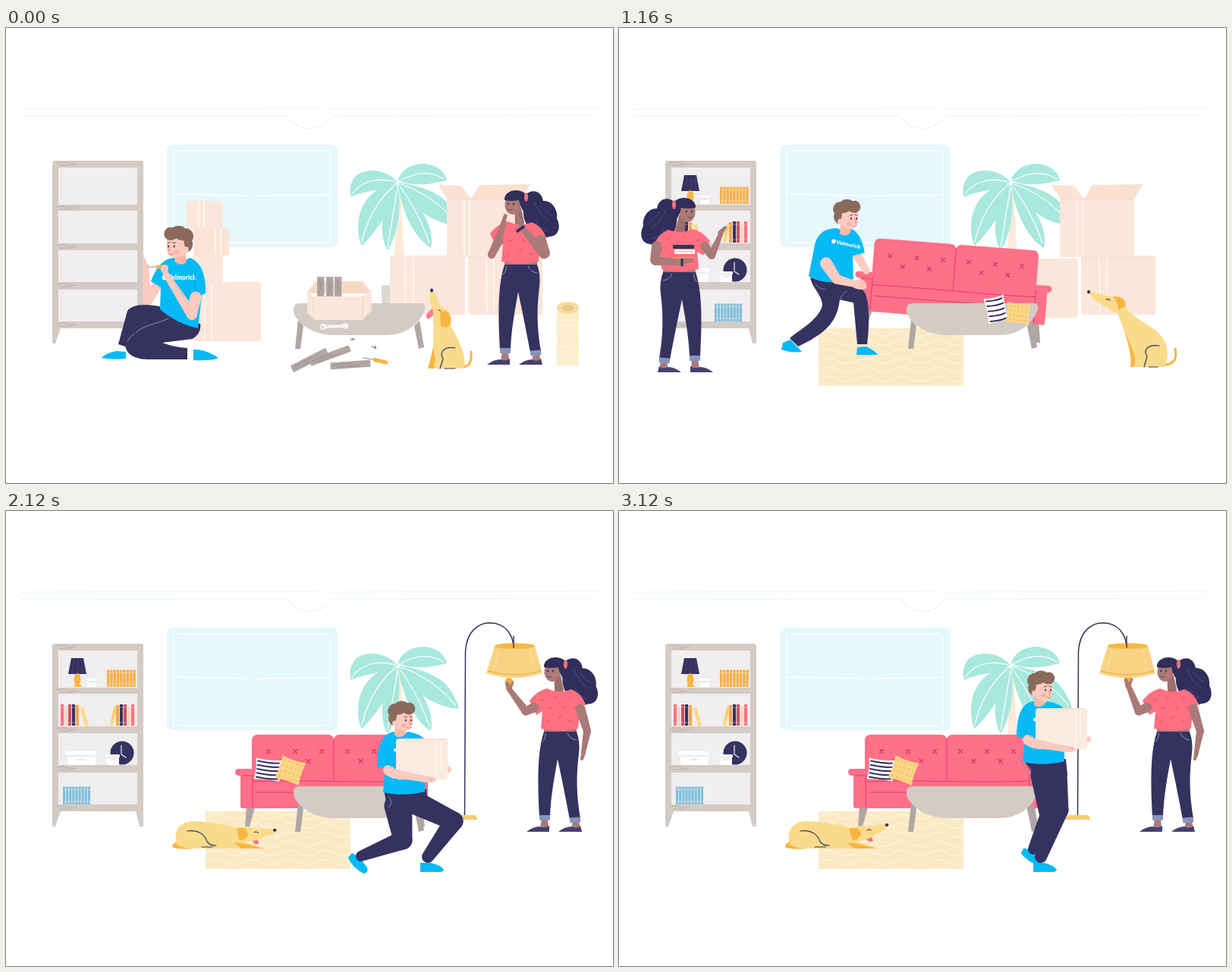
An HTML page that plays this animation: 800 by 600 pixels, repeating every 3160 ms.

```html
<!DOCTYPE html>
<html lang="en">
<head>
<meta charset="utf-8">
<title>Moving in</title>
<style>
html, body { margin: 0; width: 100%; height: 100%; overflow: hidden; background: #fff; }
svg { display: block; width: 800px; height: 600px; }
</style>
</head>
<body>
<svg id="stage" viewBox="0 0 800 600"></svg>
<script>
const LOOP = 3160, CUT1 = 1040, CUT2 = 2080;
const navy = '#363260', pink = '#ff7089', wood = '#d4cbc5', leg = '#b0a7a5', carton = '#fae6da',
  cream = '#fbeac6', gold = '#fadb8c', orange = '#f9b540', cyan = '#06baf5', fair = '#fccbbf',
  brown = '#a97a77', coral = '#ff7080', hairNavy = '#312e5c', white = '#fff';

// Drawing helpers, each returns SVG markup
const fill = (d, c) => `<path d="${d}" fill="${c}"/>`;
const line = (d, c = white, w = 1.3) =>
  `<path d="${d}" fill="none" stroke="${c}" stroke-width="${w}" stroke-linecap="round" stroke-linejoin="round"/>`;
const rect = (x, y, w, h, c, r = 0) => `<rect x="${x}" y="${y}" width="${w}" height="${h}" rx="${r}" fill="${c}"/>`;
const oval = (x, y, rx, ry, c) => `<ellipse cx="${x}" cy="${y}" rx="${rx}" ry="${ry}" fill="${c}"/>`;
const group = (tf, ...kids) => `<g transform="${tf}">${kids.join('')}</g>`;
const repeat = (n, f) => Array.from({ length: n }, (_, i) => f(i)).join('');
function limb(x1, y1, w1, x2, y2, w2, c) {
  const a = Math.atan2(y2 - y1, x2 - x1) + Math.PI / 2, u = Math.cos(a) / 2, v = Math.sin(a) / 2;
  return fill(`M${x1 + u * w1},${y1 + v * w1}L${x2 + u * w2},${y2 + v * w2}
    A${w2 / 2},${w2 / 2} 0 0 0 ${x2 - u * w2},${y2 - v * w2}L${x1 - u * w1},${y1 - v * w1}
    A${w1 / 2},${w1 / 2} 0 0 0 ${x1 + u * w1},${y1 + v * w1}Z`, c);
}

const clamp = u => Math.max(0, Math.min(1, u));
const ease = u => (u = clamp(u), u * u * (3 - 2 * u));
const mix = (a, b, u) => a + (b - a) * u;
// 0 at the start, 1 half a period later
const swing = (t, period) => (1 - Math.cos(2 * Math.PI * t / period)) / 2;

function grain(x, y, w = 22) {
  return line(`M${x},${y}q${w / 3},-2 ${w / 2},0t${w / 2},1M${x + 4},${y + 3}h${w * .6}`, '#b8a8a1', .8);
}
const plank = (x, y, w, h, angle) =>
  group(`translate(${x} ${y}) rotate(${angle})`, rect(-w / 2, -h / 2, w, h, leg, 1),
    line(`M${4 - w / 2},-1q${w / 4},-2 ${w / 2},0M${10 - w / 2},2h${w / 2}`, '#958a87', .7));

const palm = fill('M516,215H520L525,303H512Z', '#fbead9') + [
  'M516,203C501,186 476,184 462,194C453,203 452,215 455,223C470,214 496,216 516,203',
  'M514,206C488,208 470,225 465,250C462,270 466,282 469,287C488,268 512,236 514,206',
  'M516,206C501,225 494,250 496,270Q498,288 503,293C517,272 522,235 516,206',
  'M517,201C520,186 540,176 558,180C572,183 580,193 581,201C560,206 538,210 517,201',
  'M518,204C540,207 572,215 585,235Q595,250 597,261C570,260 532,240 518,204',
  'M517,206C532,216 555,245 560,270Q562,285 560,290C542,280 522,248 517,206'
].map(d => fill(d, '#a8e8df')).join('') +
  line('M513,203C490,196 468,202 456,219M512,208C494,222 476,250 469,282M516,210C511,240 506,270 503,289M520,201C540,190 560,188 577,199M521,206C550,216 576,235 592,256M520,210C538,235 550,260 558,284', white, 1.2);

const room =
  line('M20,107L418,106M425,107L780,106M20,116H371M429,116L772,115M373,117C382,136 414,138 427,119', '#e4f5fd', 1.1) +
  rect(212, 154, 225, 135, '#e6f7fd', 8) +
  line('M228,162H424M221,163V283M427,164V283M222,219L320,221M328,221L424,220M228,283H420') +
  fill('M64,175H178Q181,175 181,179V416H176L171,396H72L65,416H61V179Q61,175 64,175Z', wood) +
  [[184, 49], [241, 43], [293, 42], [345, 42]].map(([y, h]) => rect(69, y, 104, h, '#f0eeef')).join('') +
  [178, 236, 287, 338, 390].map(y => grain(67, y, 26)).join('') + palm;

const table =
  fill('M385,385L392,393L388,423H381ZM538,393L545,386L551,421L544,423Z', leg) +
  fill('M386,363H546Q554,363 552,371C545,392 525,405 500,405H430C405,404 388,392 380,378Q376,364 386,363Z', wood);

function crates(dy) {
  return rect(506, 300 + dy, 99, 78, carton, 4) + rect(609, 300, 98, 78, carton, 4) + rect(581, 224, 98, 78, carton, 2) +
    fill('M570,207L600,208L612,225H581Z', '#fae3d5') + fill('M624,207L691,206L678,227H612Z', '#fbe0d0') +
    line(`M526,302V${376 + dy}M537,302V${374 + dy}M633,303L634,376M643,303V374M604,227V300M611,227V300`) +
    line('M583,226H676M612,303H704', '#f5d5c4', .8);
}

function rug() {
  return rect(263, 396, 191, 76, cream) +
    repeat(6, i => line(`M265,${403 + i * 12}q12,-7 24,0` + 't24,0'.repeat(6) + 't20,0', '#fff5de', 1.4));
}

function books(x, base, list, w = 4.2) {
  return list.map(([c, h], i) => rect(x + i * w, base - h, w - .9, h, c) +
    line(`M${x + i * w + 1},${base - h + 4}h1.3M${x + i * w + 1},${base - 4}h1.3`, '#fff3d6', .7)).join('');
}
const row = (n, c, h) => Array.from({ length: n }, () => [c, h]);
const mixed = [[coral, 28], ['#f3d6c4', 25], ['#c9505f', 28], [navy, 28], ['#f3a44c', 27]];
function shelfItems(blueX) {
  return fill('M86,194H102L106,215H82Z', navy) + oval(94, 222, 4.5, 8, orange) + rect(90, 229, 9, 3, orange) +
    line('M90,196L87,213M95,196V213M100,196L102,213', '#4d4978', .7) +
    rect(107, 223, 12, 9, white) + rect(106, 221, 14, 3, white, 1) + line('M111,226h4M107,225h12', '#cfc7c6', .7) +
    books(133, 232, row(9, '#f5ae45', 22.5), 4.3) +
    books(72, 283, mixed, 5) + group('rotate(-15 110 283)', rect(104, 257, 5, 26, gold)) +
    group('rotate(14 136 283)', rect(136, 256, 5, 26, gold), line('M138,261v12', orange, 1)) +
    books(145, 283, mixed.slice().reverse(), 5) +
    rect(81, 320, 37, 15, white) + rect(79, 317, 40, 5, white, 1) + line('M94,328h10M81,323h36', '#cfc7c6', .8) +
    oval(153, 319, 15.5, 15.5, navy) + line('M152,309V321L158,325', white, 1.1) +
    rect(133, 323, 16, 12, white) + rect(132, 321, 18, 4, white, 1) + line('M138,328h6M134,325h14', '#cfc7c6', .8) +
    books(blueX, 387, row(9, '#7dbddc', 23.5), 4.1);
}

function sofa() {
  const cross = (x, y) => line(`M${x - 2.5},${y - 2.5}l5,5m0,-5l-5,5`, '#cf2f52', 1.1);
  return fill('M317,388H329L321,416H315ZM536,388H548L552,416H546Z', leg) +
    rect(324, 295, 108, 75, pink, 7) + rect(432, 295, 109, 75, pink, 7) +
    rect(309, 345, 247, 47, pink, 3) + rect(302, 340, 25, 9, pink, 4.5) + rect(538, 340, 24, 9, pink, 4.5) +
    line('M432,300V356M326,357C380,354 480,359 540,356M325,347V390M311,349H323M541,347V390M330,371H536', '#dd3f60', 1) +
    repeat(10, i => cross(346 + i % 5 * 17.5 + (i > 4 ? 104 : 0), i % 5 % 2 ? 330 : 317));
}

function pillow(x, y, w, h, angle, striped) {
  const a = w / 2, b = h / 2;
  const shape = `M${-a},${-b}Q0,${-b + 3} ${a},${-b}Q${a - 3},0 ${a},${b}Q0,${b - 2} ${-a},${b}Q${-a + 3},0 ${-a},${-b}Z`;
  const deco = striped
    ? repeat(5, i => line(`M${-a + 3},${-b + 4 + i * (h - 7) / 4}q${a},2 ${w - 6},0`, navy, 2))
    : repeat(20, i => oval(-a + 5 + i % 5 * (w - 10) / 4, -b + 5 + (i / 5 | 0) * (h - 9) / 3, .8, .8, '#e9a63c'));
  return group(`translate(${x} ${y}) rotate(${angle})`, fill(shape, striped ? white : '#fad585'), deco);
}

// Head facing right, origin at the middle of the face
const manHead =
  fill('M-8,5L-9,19Q-2,24 5,18L6,10Z', '#f8b9a9') +
  fill('M-9,-12H14Q17,0 14,7Q11,13 4,13Q-7,12 -9,3Z', fair) +
  fill('M-11,6C-17,3 -18,-4 -16,-8C-21,-14 -15,-24 -8,-23C-3,-28 4,-27 8,-24C15,-27 21,-18 17,-12C13,-7 8,-8 3,-11C0,-8 -3,-9 -6,-8C-6,-3 -8,2 -11,6Z', '#8a6a5d') +
  oval(-9, 3, 2.8, 3.6, fair) + oval(6, -1, 1, 1.5, navy) + oval(13, -1, 1, 1.5, navy) +
  oval(3, 6, 3, 2.5, '#ffaaa6') + line('M10,0l3,4l-2,1M7,8q3,3 6,0', '#d9756e', .9) +
  line('M4,-5l4,-1M11,-6l3,1', '#6d5146', 1);

const label = (x, y, size, angle = 0) => group(`translate(${x} ${y}) rotate(${angle})`,
  oval(0, 0, size * .4, size * .4, white),
  `<text x="${size * .5}" y="${size * .34}" fill="#fff" font-family="Lato, Inter, sans-serif" font-weight="900" font-size="${size}">Velmorick</text>`);

// Standing woman facing left, without arms
function woman(sway) {
  return group(`rotate(${sway} 737 204)`,
      fill('M736,199C746,190 758,194 760,207C772,206 780,220 778,230C784,242 780,254 768,254C757,259 745,250 744,243C732,238 732,215 736,199Z', hairNavy),
      line('M748,208Q755,225 767,233M756,212Q764,222 771,226M750,232Q755,244 766,247', '#59558a', .8)) +
    limb(727, 219, 9, 729, 236, 12, '#9c6e6b') + oval(720, 212, 10.5, 13, brown) +
    fill('M709,206C708,193 727,189 736,197C741,205 740,217 735,222Q730,216 728,206Q718,208 709,206Z', hairNavy) +
    oval(737.5, 202, 2.5, 6, coral) + oval(714, 211, 1, 1.4, hairNavy) + oval(721, 211, 1, 1.4, hairNavy) +
    oval(724, 216, 2.5, 2, '#cb7774') + line('M713,218q3,3 6,0', '#6d3f42', 1) +
    rect(709, 284, 43, 10, brown) +
    fill('M713,234Q700,237 690,250L699,269L707,264L705,287Q730,293 754,287L756,262L764,255Q758,240 745,235Q730,242 713,234Z', coral) +
    line('M704,248l4,2M722,246l3,-2M742,245l4,3M715,260l4,-1M733,258l4,2M748,260l3,-2M712,276l3,2M728,273l4,-2M742,277l4,1M697,256l3,1', '#d8475c', 1) +
    fill('M706,406H714L715,418H704ZM747,409H755L757,420H745Z', brown) +
    fill('M709,291H752Q757,305 755,320C752,345 751,370 757,405L743,407C738,380 732,350 727,327C723,350 718,375 717,403H703C700,350 701,315 709,291Z', navy) +
    rect(703, 401, 14, 7, '#8793bb', 1) + group('rotate(-5 750 407)', rect(743, 404, 14, 7, '#8793bb', 1)) +
    line('M711,293Q712,300 707,304M740,293Q743,301 752,302', '#a6acd0', .8) +
    fill('M686,423Q693,417 703,416Q710,419 716,415V423ZM728,423Q735,417 745,416Q753,420 757,415L759,423Z', '#46416f');
}

function kneelingMan(t) {
  const turn = swing(t, 480), lean = swing(t, 1440), tool = `translate(${-4 * turn} ${2 * turn})`;
  return fill('M126,435Q132,428 146,426L158,427V436Q140,438 126,435ZM247,424Q262,423 280,435Q272,439 247,438Z', cyan) +
    limb(201, 336, 14, 187, 360, 12, fair) + limb(186, 361, 12, 184, 314, 8, fair) +
    limb(183, 312, 6, 182, 304, 3, fair) +
    fill('M206,368C180,362 165,366 160,373L148,417L160,421L178,394L250,402Z', navy) +
    fill('M176,397L184,387L192,391Z', '#e6e0df') +
    fill('M256,390C205,380 165,385 158,405C153,428 165,437 190,437H239V422Q222,421 206,415L246,410Q258,402 256,390Z', navy) +
    line('M171,402C180,392 200,390 214,383M160,413Q164,406 169,403', '#a6acd0', .8) +
    fill('M226,303C210,302 199,312 191,334L204,342L203,371Q225,390 253,396L258,352L263,350C264,325 256,307 242,303Q234,309 226,303Z', cyan) +
    label(209, 329, 8.3) + line('M236,349L241,356M250,320Q248,345 250,352', '#0499d2', .9) +
    limb(250, 355, 15, 245, 377, 14, fair) +
    group(tool, line('M186,315H199', '#aeb6bf', 1.6), limb(200, 315, 5, 211, 315, 5, orange)) +
    limb(245, 378, 14, 211, 325, 8, fair) + line('M243,370L220,333', '#f2ad9e', .8) +
    group(tool, oval(209, 318, 5, 6, fair), line('M205,316l6,1M206,320l5,0', '#eda493', .8)) +
    group(`translate(${228 - 4 * lean} ${289 + lean}) scale(-1.07 1.07)`, manHead);
}

function sittingDog(t) {
  const bark = swing(t, 480);
  return line(`M603,447C612,446 ${614 - 3 * bark},438 ${613 - 3 * bark},427`, orange, 3) +
    fill('M566,410L556,449H567L574,425Z', orange) +
    fill('M566,380C561,400 563,425 566,437L563,449H604C608,430 593,404 584,390Z', gold) +
    line('M592,422C577,419 571,428 576,436L572,449M578,449H592', navy, 1.2) +
    group(`rotate(${7 * bark} 574 386)`,
      fill('M565,369C556,372 551,381 556,384C563,380 567,375 569,371Z', '#ff7b88'),
      fill('M560,345Q557,348 559,360L563,374L563,390H584Q590,373 573,367Q566,350 562,345Z', gold),
      oval(561, 346, 2, 2.4, navy), line('M570,372l3,1', navy, 1.1),
      fill('M572,376C580,368 589,378 586,391Q578,398 573,392Z', orange));
}

function unpacking(t) {
  const leftBoxes = rect(238, 228, 47, 37, carton, 3) + rect(247, 335, 89, 78, carton, 3) + rect(246, 299, 40, 37, carton, 2) +
    rect(247, 264, 47, 36, '#fbe3d5', 3) + line('M254,230V262M261,230V262M276,266V298M283,266V298M252,302V332M262,338V410M271,338V410M287,336V333');
  const onTable = rect(495, 339, 11, 24, '#dcd6d3', 2) + fill('M408,334H470L482,350H396Z', '#f8d9c8') +
    [410, 422, 433].map(x => rect(x, 328, 9.5, 30, leg) + line(`M${x + 3},331q2,8 0,20m3,-18v14`, '#958a87', .7)).join('') +
    fill('M397,347L405,354H470L482,345V372L470,385H407L397,376Z', carton) + line('M405,355V384M470,355V384', '#f3d3c3', .8) +
    line('M420,394L446,393', '#f7f5f4', 4) + oval(418, 394, 4.5, 4, '#f7f5f4') + oval(447, 393, 4.5, 3.6, '#f7f5f4') + oval(417, 394, 1.8, 1.5, wood);
  const floor = plank(400, 438, 52, 10, -27) + plank(427, 432, 56, 9, -20) + plank(454, 444, 53, 9, -4) +
    line('M471,435L483,437', '#a9adb8', 1.5) + limb(486, 437.5, 5, 501, 441, 5, orange) +
    line('M454,411l6,-1m-4,-1l1,3M482,420l6,2m-1,-3l-1,4', '#77747f', 1.1);
  const roll = rect(726, 368, 29, 77, '#fdeecb') + oval(740.5, 369, 14.5, 8, '#f9dba0') + oval(740.5, 369, 8, 4, '#f0c984') +
    repeat(4, i => line(`M727,${389 + i * 14}q14,8 27,0`, '#fff8e6', 1.2));
  const arms = limb(650, 279, 12, 640, 299, 10, brown) + limb(640, 299, 10, 655, 261, 7, brown) +
    limb(655, 259, 7, 658, 247, 4, brown) + limb(705, 280, 14, 710, 297, 14, brown) +
    limb(709, 298, 13, 679, 262, 7, brown) + limb(678, 260, 7, 674, 246, 4, brown) +
    line('M674,268L682,262', hairNavy, 3.5) + line('M658,251l3,-4M678,250l-3,-4', '#7d534f', .8);
  return leftBoxes + kneelingMan(t) + crates(0) + table + onTable + floor + sittingDog(t) +
    group('translate(-52 21)', woman(5 * swing(t, 1440))) + arms + roll;
}

function pushingMan(dy) {
  const w = y => y + dy;
  return fill('M216,415L226,411L241,427Q228,429 214,424ZM314,421L326,420Q340,427 341,431H313Z', cyan) +
    limb(312, w(296), 13, 326, w(320), 9, fair) +
    fill(`M252,${w(329)}C255,${w(343)} 268,${w(352)} 268,366C262,386 240,396 225,409L236,420C264,406 287,394 291,${w(358)}L309,${w(362)}L314,417H327C331,385 330,${w(352)} 321,${w(345)}L304,${w(333)}Z`, navy) +
    line(`M291,${w(358)}Q294,${w(350)} 300,${w(347)}M259,${w(337)}q5,7 12,7`, '#8c91bd', .8) +
    group(`translate(0 ${dy})`,
      fill('M288,264C270,263 262,272 258,285L250,327Q272,341 309,331L308,300L324,296C320,276 314,267 304,264Q296,269 288,264Z', cyan),
      label(283, 281, 7.2, 12), line('M264,302Q274,308 281,305', '#0499d2', .9),
      limb(273, 310, 16, 286, 330, 13, fair), limb(287, 331, 13, 313, 338, 8, fair),
      fill('M308,333L319,331Q328,335 326,343Q318,347 309,342Z', fair), line('M318,336l7,2M317,340l7,1', '#eda493', .8),
      group('translate(300 252)', manHead));
}

function alertDog(t) {
  return line('M718,444C734,444 735,433 733,423', orange, 3) +
    fill('M662,383C668,410 677,430 674,447H684L686,425Z', orange) +
    fill('M656,372C662,392 668,403 675,420C681,434 682,440 678,447H718Q726,436 721,418C714,395 690,392 668,370Z', gold) +
    line('M712,419C695,417 691,426 696,433L692,447M698,447H710', navy, 1.2) +
    group(`rotate(${-2 * swing(t - 1160, 640)} 662 372)`,
      fill('M619,346L650,355Q664,351 669,369Q666,382 657,377L640,367Q622,358 619,346Z', gold),
      oval(619, 348, 2, 2.4, navy), line('M642,358q3,-1 5,1', navy, 1.2),
      fill('M651,354Q667,353 668,366L658,372Q658,362 651,354Z', orange));
}

function arranging(t) {
  const drop = (t - CUT1) / (CUT2 - CUT1), tilt = 5 - 4.7 * drop;
  const arms = limb(113, 288, 12, 122, 300, 10, brown) + limb(122, 300, 10, 134, 272, 6, brown) + limb(134, 270, 7, 140, 263, 4, brown) +
    rect(70, 299, 30, 7, coral, 1) + rect(73, 292, 27, 6, white, 1) + rect(71, 286, 28, 5, navy, 1) + line('M73,295H98M72,303H97', '#e2b45c', 1) +
    limb(50, 288, 14, 47, 306, 12, brown) + limb(48, 307, 12, 80, 309, 8, brown) + limb(80, 309, 9, 95, 306, 5, brown) +
    line('M83,305V313', hairNavy, 3);
  return crates(4) + shelfItems(126) + rug() +
    group(`translate(${mix(5.5, .5, drop)} 0) rotate(${tilt} 560 392)`, sofa()) + table +
    pillow(497, 371, 27, 34, -12, true) + pillow(526, 376, 31, 27, 6) + pushingMan(11.5 * drop - 1) +
    group('translate(810 31) scale(-1 1)', woman(3 * swing(t - 1160, 640))) + arms + alertDog(t);
}

function carryingMan(t) {
  const rise = ease((t - 2120) / 440), walk = ease((t - 2560) / 560);
  const at = (crouch, stand, stride) => mix(mix(crouch, stand, rise), stride, walk);
  const x = at(-1, 0, 34), y = at(39, 0, -1), turn = 9 * walk;
  const kx = at(590, 552, 580), ky = at(409, 396, 394);
  const bx = at(523, 504, 567), by = at(434, 396, 402);
  const fx = at(468, 465, 546), fy = at(455, 454, 446);
  return group(`translate(${fx - 465} ${fy - 454}) rotate(${-12 * walk} 463 454)`,
      fill('M453,450L463,456L473,469Q475,477 468,477Q453,469 448,456Z', cyan)) +
    limb(x + 518 + turn, y + 350, 37, bx, by, 25, navy) + limb(bx, by, 25, fx, fy, 14, navy) +
    fill('M546,464H560Q573,467 577,473Q576,476 572,476H546Z', cyan) +
    limb(x + 541, y + 346, 31, kx, ky, 25, navy) + limb(kx, ky, 25, 556, 456, 16, navy) +
    group(`translate(${x} ${y})`,
      fill(`M499,328H555L557,350Q535,364 ${503 + turn},350Z`, navy), line('M506,338Q512,346 505,352', '#8c91bd', .9),
      fill('M512,252C496,254 490,272 490,298L501,301L498,332Q525,338 553,331V262Q545,254 531,252Q522,258 512,252Z', cyan),
      oval(514, 276, 2.2, 2.2, white),
      rect(570, 298, 18, 8, fair, 4), rect(515, 261, 68, 54, '#faeadf', 4), line('M568,263V313M574,263V300', '#fff8f3', 1.3),
      line('M517,262H581', '#f3d3c3', .8),
      limb(505, 303, 14, 513, 308, 12, fair), limb(511, 307, 12, 551, 314, 8, fair),
      fill('M548,309L558,311Q568,312 568,317Q560,321 548,318Z', fair), line('M559,314h7', '#eda493', .8),
      line('M501,290L509,299', '#0499d2', .9),
      group('translate(522 238)', manHead));
}

function lyingDog(t) {
  const lift = ease((t - 2120) / 300);
  return line('M250,443Q234,445 221,442Q222,438 230,438', orange, 4) +
    fill('M224,437C221,420 230,409 248,409C273,410 300,415 312,421L316,437L340,445H245Q228,444 224,437Z', gold) +
    fill('M300,437Q320,439 340,445H310Z', orange) + line('M239,422C256,420 263,429 265,436Q270,442 277,441M258,443H272', navy, 1.2) +
    group(`rotate(${mix(9, 0, lift)} 310 425)`,
      fill('M324,430Q329,428 333,430L335,435Q331,438 327,434Z', '#ff6f87'),
      fill('M302,420Q315,413 328,416L352,412Q357,415 350,420L331,431Q318,437 306,434Z', gold),
      oval(353, 414, 2.3, 1.9, navy), line('M327,421q2,-2 5,0', navy, 1.1),
      fill('M303,419Q318,415 319,427Q314,435 308,434Q306,427 303,419Z', orange));
}

function settled(t) {
  const reach = ease((t - 2120) / 260), hx = mix(663, 671, reach), hy = mix(232, 228, reach);
  const bulb = oval(hx, hy - 6, 5.5, 6, '#f3ab3a');
  const lamp = line('M604.5,402L605.5,185C607,160 621,147.5 638,147.5C658,148 668,162 669,180', navy, 1.5) +
    fill('M592,401H618L622,407H587Z', '#f7cd6b') + bulb +
    fill('M644,178H697L707,214Q670,226 633,214Z', '#f9d384') + oval(670.5, 178, 26.5, 3.8, '#f5b942') +
    line('M669,165V180', navy, 1.5) + line('M635,211Q670,221 705,211', '#e9a83e', 1) + line('M650,184L643,210M690,184L696,208', '#fde6ad', .8);
  const arms = limb(696, 259, 13, 685, 264, 11, brown) + limb(685, 264, 11, hx + 1, hy + 4, 7, brown) +
    limb(hx, hy + 2, 8, hx - 3, hy - 5, 4, brown) + line(`M${hx + 2},${hy + 2}L${hx + 5},${hy - 6}`, brown, 3) +
    limb(757, 261, 13, 766, 290, 10, brown) + limb(766, 290, 10, 761, 318, 6, brown) + limb(761, 319, 6, 759, 327, 4, brown);
  return shelfItems(75) + rug() + sofa() + pillow(345, 341, 34, 28, 6, true) + pillow(375, 342, 33, 31, 19) + table +
    lyingDog(t) + lamp + carryingMan(t) + woman(3 * swing(t - 2000, 560)) + arms;
}

const stage = document.getElementById('stage');
function frame() {
  const now = performance.now() % LOOP, t = now - now % 40;
  stage.innerHTML = room + (t < CUT1 ? unpacking : t < CUT2 ? arranging : settled)(t);
  requestAnimationFrame(frame);
}
frame();
</script>
</body>
</html>
```
